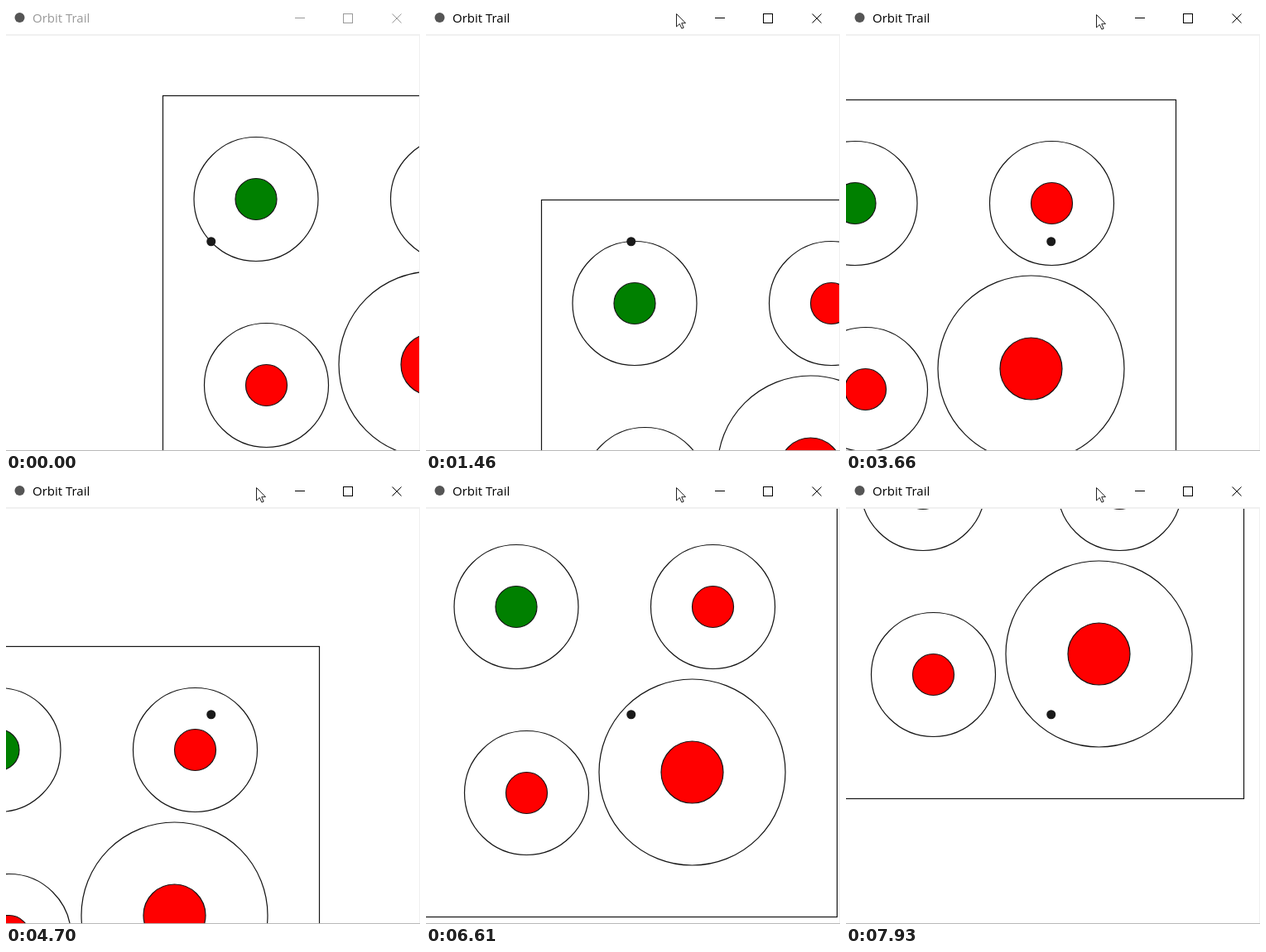
These frames come from a looping animation (500 px wide and 538 px high, 8 s). An HTML page with a canvas:

```html
<!DOCTYPE html>
<html lang="en">
<head>
<meta charset="utf-8">
<title>Orbit Trail</title>
<style>
  html, body { margin: 0; width: 100%; height: 100%; overflow: hidden; background: #fff; }
  canvas { display: block; }
</style>
</head>
<body>
<canvas id="stage" width="500" height="538"></canvas>
<script>
const ctx = document.getElementById('stage').getContext('2d');
const LOOP = 8000, INK = '#141414';
const SHIP = { x: 247, y: 284.5 };
const FOCUS_TIME = 1050;

// Positions are relative to the top left corner of the 500 x 500 world.
const green = { x: 112.5, y: 125, size: 25, range: 75, orbit: 75, color: '#008000' };
const red = { x: 350, y: 125, size: 25, range: 75, orbit: 47, color: '#f00' };
const low = { x: 125, y: 350, size: 25, range: 75, color: '#f00' };
const big = { x: 325, y: 325, size: 37.5, range: 112.5, orbit: 94, color: '#f00' };
const planets = [green, red, low, big];

// Time, planet, angle in degrees: arcs around one planet, straight lines between two.
const route = [
  [0, green, 137], [1460, green, 266.2], [1762, green, 300.9],
  [3462, red, 121], [4700, red, -65.4], [5340, red, -159.6],
  [6930, big, 200.4], [LOOP, big, 123.2]
];

const cursorShape = new Path2D('M0 0V15.5L3.8 12L6.4 17.7L8.7 16.7L6.2 11.2H11Z');

const mix = (a, b, p) => a + (b - a) * p;

function onOrbit(planet, degrees) {
  const a = degrees * Math.PI / 180;
  return { x: planet.x + planet.orbit * Math.cos(a), y: planet.y + planet.orbit * Math.sin(a) };
}

function shipAt(t) {
  const next = route.findIndex(stop => stop[0] > t);
  const [t0, from, a0] = route[next - 1], [t1, to, a1] = route[next];
  const p = (t - t0) / (t1 - t0);
  if (from === to) return onOrbit(from, mix(a0, a1, p));
  const start = onOrbit(from, a0), end = onOrbit(to, a1);
  return { x: mix(start.x, end.x, p), y: mix(start.y, end.y, p) };
}

function circle(x, y, r, fill, stroke) {
  ctx.beginPath();
  ctx.arc(x, y, r, 0, Math.PI * 2);
  if (fill) { ctx.fillStyle = fill; ctx.fill(); }
  if (stroke) { ctx.strokeStyle = stroke; ctx.stroke(); }
}

function line(...points) {
  ctx.beginPath();
  for (let i = 0; i < points.length; i += 2) ctx.lineTo(points[i], points[i + 1]);
  ctx.stroke();
}

function drawWorld(t) {
  const ship = shipAt(t);
  ctx.save();
  ctx.beginPath();
  ctx.rect(0, 36, 500, 501);
  ctx.clip();
  ctx.translate(Math.round(SHIP.x - ship.x) + 0.5, Math.round(SHIP.y - ship.y) + 0.5);
  ctx.lineWidth = 1.2;
  ctx.strokeStyle = INK;
  ctx.strokeRect(0, 0, 500, 500);
  for (const { x, y, range, size, color } of planets) {
    circle(x, y, range, null, INK);
    circle(x, y, size, color, INK);
  }
  ctx.restore();
  circle(SHIP.x + 0.75, SHIP.y + 0.25, 5.5, '#1a1a1a');
}

function drawTitleBar(active) {
  ctx.fillStyle = '#f0f0f0';
  ctx.fillRect(0, 34, 500, 2);
  ctx.fillRect(499, 36, 1, 501);
  ctx.fillStyle = '#b8b8b8';
  ctx.fillRect(0, 537, 500, 1);
  circle(16.5, 14, 6, '#555');

  ctx.fillStyle = ctx.strokeStyle = active ? '#000' : '#999';
  ctx.font = '15px "Open Sans", "Noto Sans", sans-serif';
  ctx.fillText('Orbit Trail', 32, 20);
  ctx.lineWidth = 1;
  line(349, 14.5, 361, 14.5);
  ctx.strokeRect(407.5, 9.5, 11, 11);
  line(466.5, 9.5, 477.5, 20.5);
  line(477.5, 9.5, 466.5, 20.5);
}

function drawCursor(t) {
  const y = mix(-20, 9, Math.min(1, (t - FOCUS_TIME + 100) / 150)) + (t > 1730 ? 1 : 0);
  ctx.save();
  ctx.translate(302.5, y + 0.5);
  ctx.fillStyle = '#fff';
  ctx.strokeStyle = '#222';
  ctx.lineWidth = 1;
  ctx.fill(cursorShape);
  ctx.stroke(cursorShape);
  ctx.restore();
}

function draw(now) {
  const t = (now - startTime) % LOOP;
  ctx.fillStyle = '#fff';
  ctx.fillRect(0, 0, 500, 538);
  drawWorld(t);
  drawTitleBar(t >= FOCUS_TIME);
  if (t >= FOCUS_TIME - 100) drawCursor(t);
}

const startTime = performance.now();
function tick() {
  draw(performance.now());
  requestAnimationFrame(tick);
}
tick();
</script>
</body>
</html>
```
